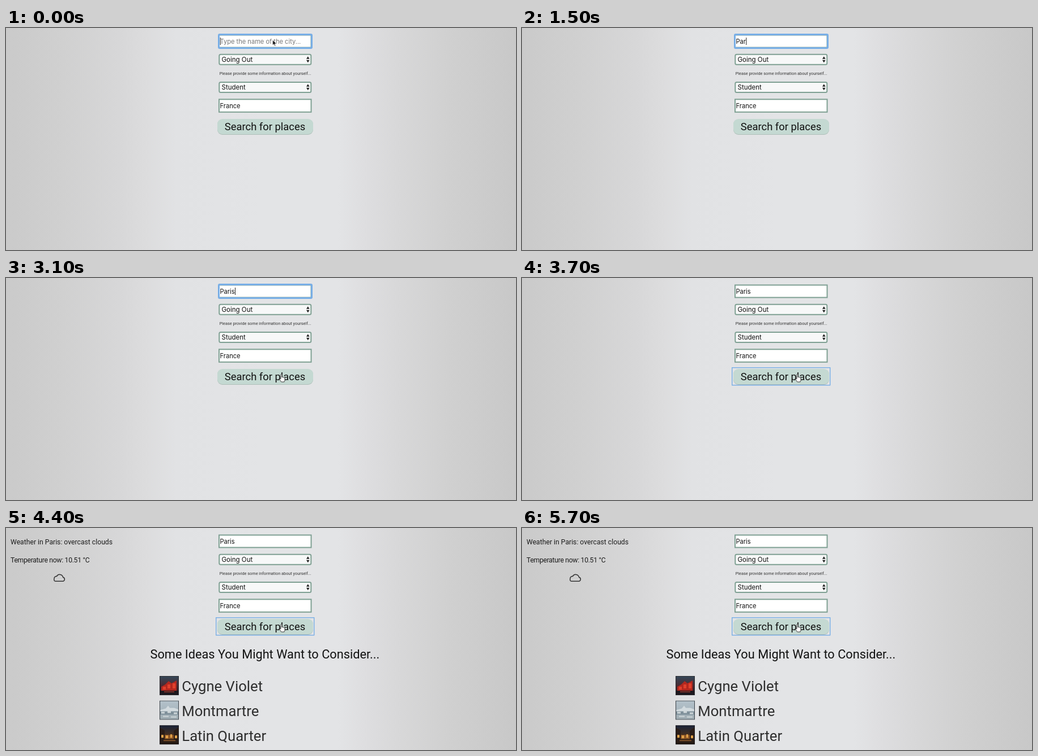
An HTML page for the animation above (5800 ms loop, 900 by 393 pixels).

```html
<!DOCTYPE html>
<html lang="en">
<head>
<meta charset="utf-8">
<title>City search</title>
<style>
html, body { margin: 0; width: 100%; height: 100%; overflow: hidden; }
body {
  background: linear-gradient(90deg, #cacaca 0, #d0d0d0 100px, #d7d7d8 200px,
    #dcdcdd 245px, #e1e2e4 300px, #e3e4e6 450px, #e3e4e6 585px, #dedee0 632px,
    #d8d8d9 690px, #d0d0d0 780px, #c8c8c8 900px);
}
svg { display: block; width: 900px; height: 393px; }
text { font-family: Roboto, sans-serif; fill: #1c1c1c; white-space: pre; }
.input, .select { stroke: #7fa093; stroke-width: 2; }
.input { fill: #fff; }
.select { fill: #f7f8f8; }
.ui { font: 11.1px Inter, sans-serif; fill: #111; }
.choice { font-size: 11.5px; }
.hint { font-size: 7.34px; fill: #333; }
.button { font-size: 18.4px; fill: #111; }
.weather { font-size: 12.2px; }
.heading { font-size: 21.75px; fill: #111; }
.place { font-size: 25.7px; fill: #2e2e2e; }
.ring { fill: none; stroke: #78aee6; }

.field-focus, .button-focus, .results, .arrow, .hand { animation: 5.8s infinite step-end; }
.field-focus { animation-name: field-focus; }
.button-focus { animation-name: button-focus; }
.results { animation-name: results; }
.arrow { animation-name: arrow; }
.hand { animation-name: hand; }
.arrow-path { animation: arrow-path 5.8s infinite linear; }
.hand-path { animation: hand-path 5.8s infinite ease-out; }

/* 100ms is 1.7241% of the loop */
@keyframes field-focus { 0% { opacity: 1 } 58.62%, 100% { opacity: 0 } }
@keyframes button-focus { 0% { opacity: 0 } 58.62%, 100% { opacity: 1 } }
@keyframes results { 0% { opacity: 0 } 65.51%, 100% { opacity: 1 } }
@keyframes arrow {
  0% { opacity: 1 }
  17.24% { opacity: 0 }
  34.48% { opacity: 1 }
  48.27%, 100% { opacity: 0 }
}
@keyframes hand { 0% { opacity: 0 } 48.27%, 100% { opacity: 1 } }
@keyframes arrow-path {
  0%, 34.48% { transform: translate(470.5px, 21px) }
  37.93% { transform: translate(478px, 64.5px) }
  48.27%, 100% { transform: translate(486px, 161px) }
}
@keyframes hand-path {
  0%, 48.27% { transform: translate(482px, 162px) }
  51.72%, 100% { transform: translate(482.5px, 170px) }
}
</style>
</head>
<body>
<svg viewBox="0 0 900 393">
  <defs>
    <path id="spinner" d="M530 4.7 532.8 0.3 535.6 4.7ZM530 6.8 532.8 11.2 535.6 6.8Z" fill="#222"/>
    <clipPath id="thumb"><rect width="34" height="34"/></clipPath>
    <linearGradient id="dusk" x2="0" y2="1">
      <stop stop-color="#33495a"/><stop offset=".5" stop-color="#4a2b33"/><stop offset="1" stop-color="#1f181d"/>
    </linearGradient>
    <linearGradient id="day" x2="0" y2="1">
      <stop stop-color="#b4c2cb"/><stop offset=".5" stop-color="#a9b7bf"/><stop offset="1" stop-color="#9eabb1"/>
    </linearGradient>
    <linearGradient id="night" x2="0" y2="1">
      <stop stop-color="#18233a"/><stop offset=".55" stop-color="#4a301d"/><stop offset="1" stop-color="#1b130f"/>
    </linearGradient>
  </defs>

  <rect class="input" x="376" y="12.5" width="162.5" height="22"/>
  <g class="field-focus">
    <rect class="ring" x="375.5" y="11.5" width="164" height="24" rx="1.5" stroke-width="3"/>
    <rect id="caret" x="378" y="17" width="1" height="13" fill="#222"/>
  </g>
  <text id="city" class="ui" x="377.5" y="27.7"></text>

  <rect class="select" x="376.3" y="46.7" width="162" height="18" rx="2.5"/>
  <text class="ui choice" x="380.5" y="59.7">Going Out</text>
  <use href="#spinner" y="50"/>

  <text class="hint" x="376.7" y="83">Please provide some information about yourself...</text>

  <rect class="select" x="376.3" y="95.9" width="162" height="18" rx="2.5"/>
  <text class="ui choice" x="380.5" y="108.8">Student</text>
  <use href="#spinner" y="99"/>

  <rect class="input" x="376" y="126.3" width="162.5" height="22.5"/>
  <text class="ui" x="377.5" y="142">France</text>

  <rect x="373" y="161.7" width="169" height="27.3" rx="9" fill="#aebfb9"/>
  <rect x="373" y="161" width="169" height="27" rx="9" fill="#c4d9d2"/>
  <text class="button" x="385.8" y="180.7">Search for places</text>
  <rect class="ring button-focus" x="370.7" y="158.7" width="173" height="31" stroke-width="1.4"/>

  <g class="results">
    <text class="weather" x="8" y="28.5">Weather in Paris: overcast clouds</text>
    <text class="weather" x="8" y="60.5" letter-spacing="-.3">Temperature now: 10.51 °C</text>
    <path d="M88 94.3h12a3.6 3.6 0 0 0 .6-7.1a6 6 0 0 0-11.2-1.6a4 4 0 0 0-4.4 4.6a2.9 2.9 0 0 0 3 4.1z"
      fill="none" stroke="#333" stroke-width="1.5"/>
    <text class="heading" x="254.5" y="231.3">Some Ideas You Might Want to Consider...</text>

    <g transform="translate(271 262)" clip-path="url(#thumb)">
      <rect width="34" height="34" fill="url(#dusk)"/>
      <path d="M3 19 10 15 16 9 21 13 30 8V26H3Z" fill="#b3281f"/>
      <path d="M6 19H11V24H6ZM14 15H19V22H14ZM23 13H28V22H23Z" fill="#e0402c"/>
      <path d="M0 26H34V34H0Z" fill="#1d181e"/>
      <path d="M8 27H26V29H8Z" fill="#7d3029"/>
      <rect x=".5" y=".5" width="33" height="33" fill="none" stroke="#2b2b30"/>
    </g>
    <text class="place" x="310.3" y="289">Cygne Violet</text>

    <g transform="translate(271 305.5)" clip-path="url(#thumb)">
      <rect width="34" height="34" fill="url(#day)"/>
      <path d="M0 17 11 14 15 9 18 13 26 13 34 16V22H0Z" fill="#d3dbdf"/>
      <path d="M0 19H34V25H0Z" fill="#7f909a"/>
      <path d="M3 20H9V23H3ZM14 18H20V22H14ZM25 21H31V24H25ZM6 27H16V29H6ZM20 28H30V30H20Z" fill="#cdd5d8"/>
      <rect x=".5" y=".5" width="33" height="33" fill="none" stroke="#3a4147"/>
    </g>
    <text class="place" x="310.3" y="332.7">Montmartre</text>

    <g transform="translate(271 349.3)" clip-path="url(#thumb)">
      <rect width="34" height="34" fill="url(#night)"/>
      <path d="M0 4 9 9V29H0ZM25 10 34 3V30H25Z" fill="#2a1d18"/>
      <path d="M9 17H25V24H9Z" fill="#8f5726"/>
      <path d="M3 17H7V22H3ZM11 18H15V23H11ZM19 16H22V22H19ZM27 18H31V23H27Z" fill="#e3a34a"/>
      <path d="M7 26H28V28H7Z" fill="#7d4f28"/>
      <rect x=".5" y=".5" width="33" height="33" fill="none" stroke="#1d1a1c"/>
    </g>
    <text class="place" x="310.3" y="376.5">Latin Quarter</text>
  </g>

  <g class="arrow"><g class="arrow-path">
    <path d="M0 0V9.6L2.2 7.6 3.7 11.1 5.4 10.4 3.9 7H6.9Z" fill="#111" stroke="#fff" stroke-width=".8"/>
  </g></g>
  <g class="hand"><g class="hand-path">
    <path d="M2.4 8.6V1.4a1.1 1.1 0 0 1 2.2 0V5.6Q6 4.9 6.6 6Q8 5.4 8.4 6.6Q9.6 6.4 9.6 7.8V10.4L8.4 14H3.4L.4 9.6Q.2 7.6 2.4 8.6Z"
      fill="#fff" stroke="#222" stroke-width=".9"/>
  </g></g>
</svg>
<script>
const LOOP = 5800, BLINK = 500, LEFT = 377.5;
const KEYS = [1000, 1200, 1400, 1700, 1900];
const WORD = "Paris", PLACEHOLDER = "Type the name of the city...";
const city = document.getElementById("city");
const caret = document.getElementById("caret");
const start = performance.now();

function render(now) {
  const t = Math.max(0, now - start) % LOOP;
  const typed = KEYS.filter(key => key <= t).length;
  const text = typed ? WORD.slice(0, typed) : PLACEHOLDER;
  if (city.textContent !== text) {
    city.textContent = text;
    city.style.fill = typed ? "#111" : "#777";
    const width = typed ? city.getComputedTextLength() : 0;
    caret.setAttribute("x", LEFT + width + 0.3);
  }
  // The blink restarts with every key press.
  const idle = t - (typed ? KEYS[typed - 1] : 0);
  caret.style.opacity = Math.floor(idle / BLINK) % 2 ? 0 : 1;
  requestAnimationFrame(render);
}
render(start);
</script>
</body>
</html>
```
